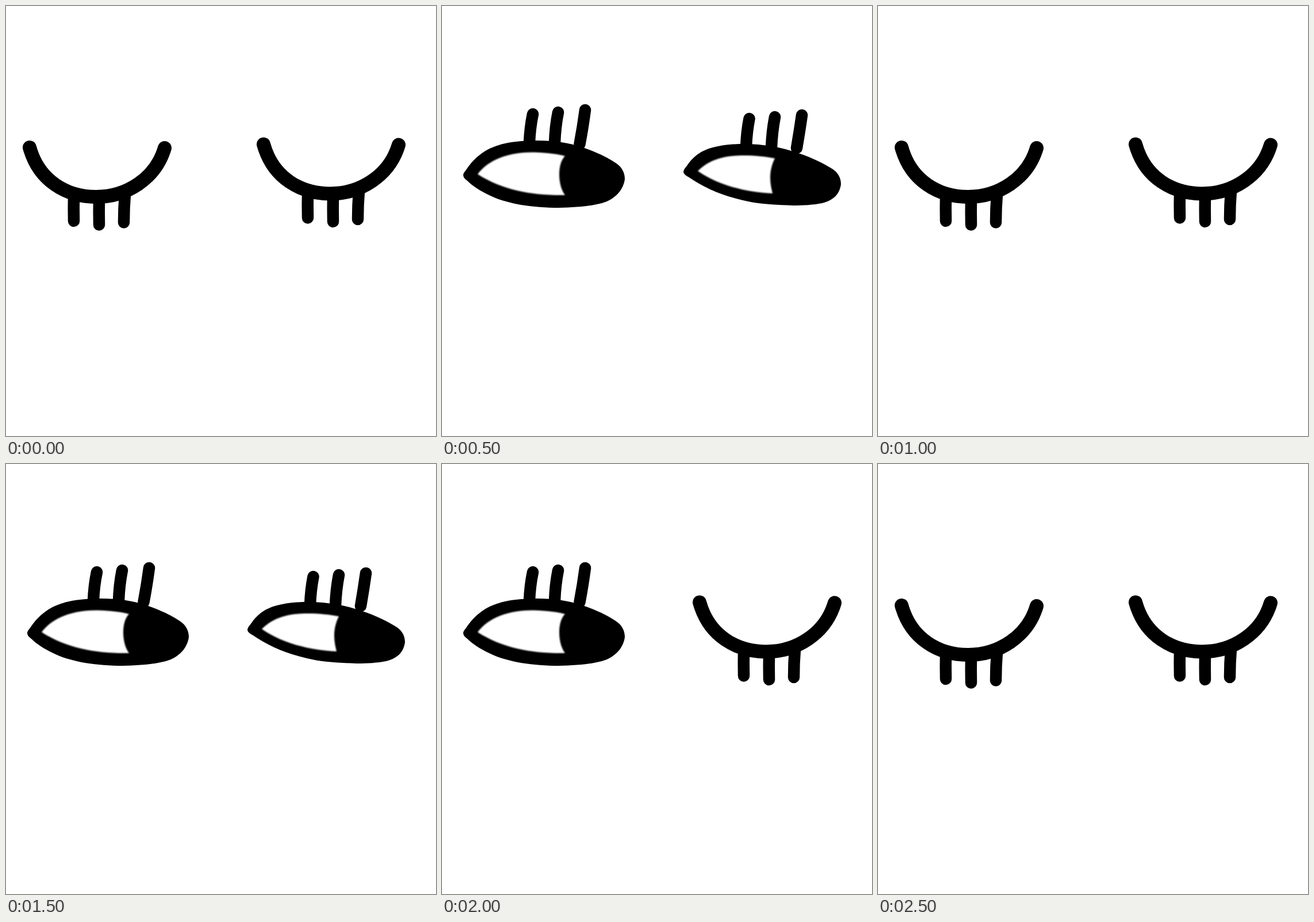
An HTML page that plays this animation: 748 by 748 pixels, repeating every 3 s.

```html
<!DOCTYPE html>
<html lang="en">
<head>
<meta charset="utf-8">
<title>Winking eyes</title>
<style>
  html, body { margin: 0; width: 100%; height: 100%; overflow: hidden; background: #fff; }
  svg { display: block; width: 100%; height: 100%; }
  .lid, .lash { fill: none; stroke: #000; stroke-linecap: round; stroke-linejoin: round; }
  .lid { stroke-width: 24px; }
  .lash { stroke-width: 20.5px; }
  .white { fill: #fff; }
  .left.open { animation: left-open 3s step-end infinite; }
  .left.shut { animation: left-shut 3s step-end infinite; }
  .right.open { animation: right-open 3s step-end infinite; }
  .right.shut { animation: right-shut 3s step-end infinite; }
  @keyframes left-open {
    0%, 33.3333%, 83.3333%, 100% { visibility: hidden; }
    16.6667%, 50% { visibility: visible; }
  }
  @keyframes left-shut {
    0%, 33.3333%, 83.3333%, 100% { visibility: visible; }
    16.6667%, 50% { visibility: hidden; }
  }
  @keyframes right-open {
    0%, 33.3333%, 66.6667%, 100% { visibility: hidden; }
    16.6667%, 50% { visibility: visible; }
  }
  @keyframes right-shut {
    0%, 33.3333%, 66.6667%, 100% { visibility: visible; }
    16.6667%, 50% { visibility: hidden; }
  }
</style>
</head>
<body>
<svg viewBox="0 0 748 748">
  <defs>
    <filter id="soft"><feGaussianBlur stdDeviation="0.8"/></filter>
    <g id="shut">
      <path class="lid" d="M41 246C57 304 105 332 157 332C209 332 260 301 276 247"/>
      <path class="lash" d="M118 330Q117.500 352 118 374M162 335Q161.500 358 162 380.500M207 328Q205 352 205 376.500"/>
    </g>
  </defs>

  <use class="left shut" href="#shut"/>
  <use class="right shut" href="#shut" x="407" y="-5.500"/>

  <g class="left open">
    <path d="M37 294C37 290 41 287 44 282C61 258 82 245 110 239C125 235.500 145 234 165 234C195 234 222 238 245 246C268 254 290 264 305 275C314 282 318 291 318 301C316 318 303 336 278 343C255 349 225 351 195 351C150 350 110 343 82 329C65 321 52 312 44 304C40 301 37 298 37 294Z"/>
    <path class="lash" d="M158 188Q153 212 152 238M202 185Q197 210 196 238M249 181Q245 211 239.500 240"/>
    <path class="white" filter="url(#soft)" d="M62 292.500C82 266 118 254 160 254.500C180 255 198 257 214 261C207 268 204 280 204 293C204 308 208 321 214 329C160 330 106 321 62 292.500Z"/>
  </g>

  <g class="right open">
    <path d="M420 288C421 283 425 280 428 275C441 257 458 248 480 244C495 241 510 240 525 240C560 240 592 246 620 256C644 264 664 274 680 284C690 291 694 300 694 310C692 326 682 338 661 343C646 346 628 347 610 347C585 346 562 345 540 341.500C495 333 460 319 428 297C424 295 420 292 420 288Z"/>
    <path class="lash" d="M534.500 196Q530 219 529 245M579 193Q574 219 573 247M626 190Q622 218 617 247"/>
    <path class="white" filter="url(#soft)" d="M445 287C463 270 485 260 525 260C545 260 563 262 579 265C573 277 571 288 571 299C571 309 573 318 575 326C530 324 480 312 445 287Z"/>
  </g>
</svg>
</body>
</html>
```
